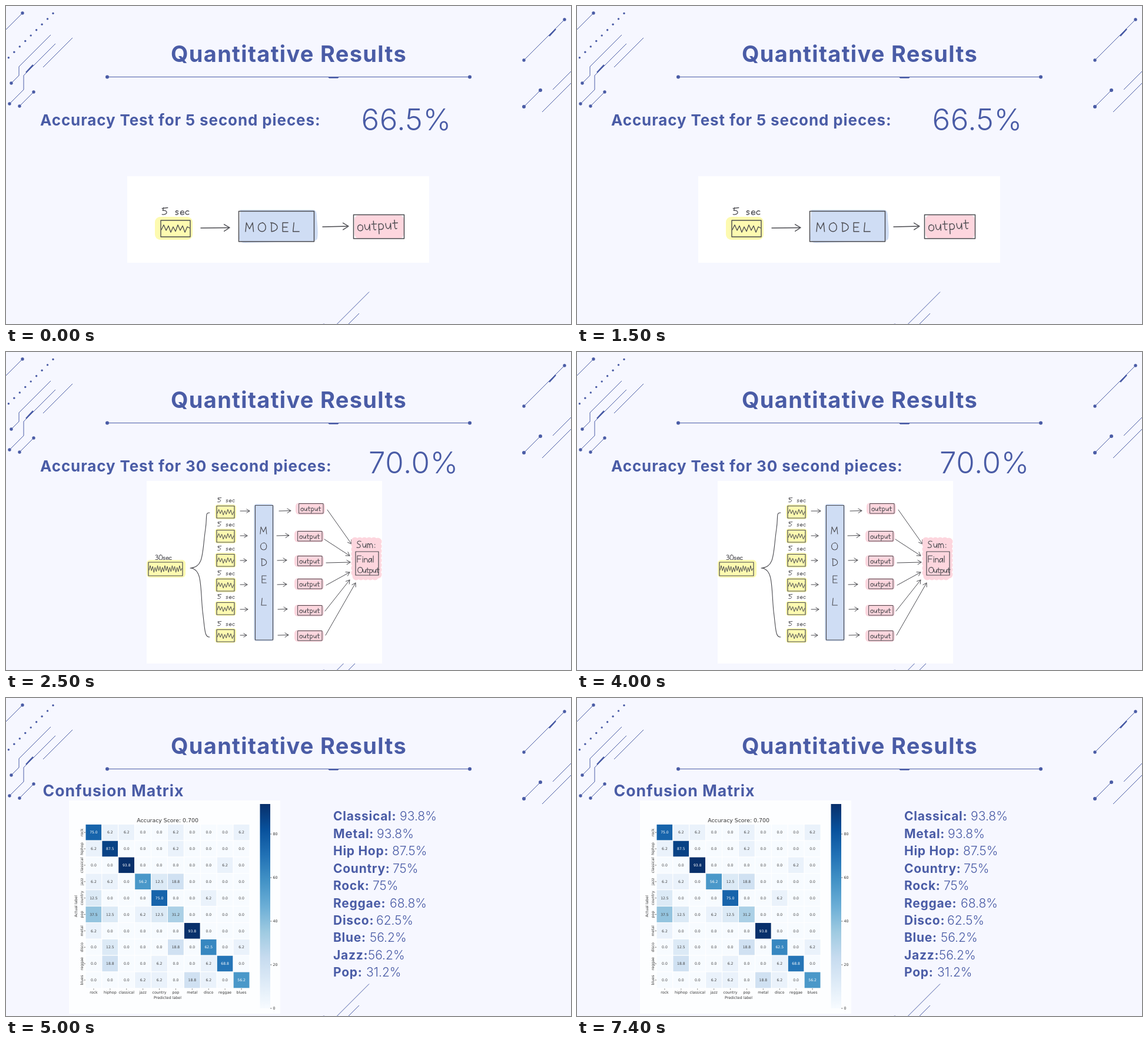
Write an HTML page that moves like this. It is 960 by 540 pixels and loops after 9 s.

```html
<!DOCTYPE html>
<html lang="en">
<head>
<meta charset="utf-8">
<title>Quantitative Results</title>
<style>
html, body { margin: 0; width: 100%; height: 100%; overflow: hidden; background: #f6f7ff; }
svg { display: block; width: 960px; height: 540px; }
.sans { font-family: Inter, "Open Sans", sans-serif; fill: #4a5ca6; }
.bold { font-weight: 700; }
.light { font-weight: 300; }
.plot { font-family: "DejaVu Sans", sans-serif; fill: #333; text-anchor: middle; }
.trace { fill: none; stroke: #4a5ca6; }
.ink { fill: none; stroke: #4b4b50; stroke-linecap: round; stroke-linejoin: round; }
</style>
</head>
<body>
<svg id="stage" viewBox="0 0 960 540"></svg>
<script>
const stage = document.getElementById('stage');

function el(parent, tag, attrs, text) {
  const node = document.createElementNS('http://www.w3.org/2000/svg', tag);
  for (const k in attrs) node.setAttribute(k, attrs[k]);
  if (text !== undefined) node.textContent = text;
  parent.appendChild(node);
  return node;
}
const group = (parent, attrs) => el(parent, 'g', attrs);
const box = (p, x, y, width, height, attrs) => el(p, 'rect', { x, y, width, height, ...attrs });
const path = (p, d, attrs) => el(p, 'path', { d, ...attrs });
const blob = (p, x, y, w, h, fill, rx = 6) => box(p, x, y, w, h, { fill, rx });
const label = (p, s, x, y, size, cls, attrs) =>
  el(p, 'text', { x, y, 'font-size': size, class: cls, ...attrs }, s);
const bold = (p, s, x, y, size, attrs) =>
  label(p, s, x, y, size, 'sans bold', { 'letter-spacing': '0.034em', ...attrs });
const score = (p, s, x, y) => label(p, s, x, y, 51, 'sans light', { 'letter-spacing': '0.01em' });

const BLUE = '#4a5ca6', YELLOW = '#fdfab0', SKY = '#cfddf4', PINK = '#fdd6de';

// Pen strokes on a 10 unit cap height: [width, path]
const GLYPHS = {
  M: [9, 'M0 10L1 0L4.5 7L8 0L9 10'],
  O: [8, 'M5 0C-2 0-2 10 4 10C10 10 9 0 4 0'],
  D: [8, 'M1 0V10C11 9 9 0 0 0'],
  E: [6, 'M6 0H0V10H6M0 5H5'],
  L: [7, 'M1 0L0 10H7'],
  S: [6, 'M6 1C2-1-1 3 2 4.5C7 6 6 11 0 9.5'],
  F: [6, 'M6 0H0V10M0 5H5'],
  0: [7, 'M4 0C-1 0-1 10 3 10C8 10 8 0 3 0'],
  3: [6, 'M0 1C4-1 7 3 2 4.5C8 5 5 11 0 9.5'],
  5: [9, 'M3 0L2 4C10 3 9 11 1 9.5M1 1L9 0'],
  a: [5, 'M5 5C1 2-1 8 1 10C3 10 4 8 5 4V10'],
  c: [5, 'M5 5C1 3-1 7 1 9C2 10 4 10 5 9'],
  e: [5, 'M0 7.5L5 7C5 3 0 4 0 7.5C0 11 4 10 5 9'],
  i: [2, 'M1 4V10M1 1.5V2'],
  l: [2, 'M1 0V10'],
  m: [7, 'M0 4V10M0 6C1 3 3 3 3 10M3 6C4 3 7 3 7 10'],
  n: [5, 'M0 4V10M0 6C2 3 5 3 5 10'],
  o: [5, 'M3 4C-1 4-1 10 2.5 10C6 10 6 4 2.5 4'],
  p: [5, 'M0 4V14M0 5C3 2 6 6 4 9C3 10 1 10 0 9'],
  s: [5, 'M4 5C0 3-1 7 2 7C5 7 4 11 0 9.5'],
  t: [5, 'M2 1V8C2 10 3 10 4 9.5M0 4H5'],
  u: [5, 'M0 4C0 11 4 11 5 4V10'],
  ':': [2, 'M1 5V5.5M1 9V9.5'],
  ' ': [7, '']
};

function hand(p, s, x, base, k, gap = 2, pen = 1, turn = 0) {
  const g = group(p, { class: 'ink', role: 'img', 'aria-label': s, 'stroke-width': pen / k,
    transform: `translate(${x} ${base}) rotate(${turn}) scale(${k}) translate(0 -10)` });
  let at = 0;
  for (const ch of s) {
    const [w, d] = GLYPHS[ch];
    if (d) path(g, d, { transform: `translate(${at} 0)` });
    at += w + gap;
  }
}

function arrow(p, x1, y1, x2, y2, head = 6, pen = 1) {
  const a = Math.atan2(y2 - y1, x2 - x1);
  const tip = s => `${x2 - head * Math.cos(a + s)} ${y2 - head * Math.sin(a + s)}`;
  path(p, `M${x1} ${y1}L${x2} ${y2}M${tip(0.55)}L${x2} ${y2}L${tip(-0.55)}`,
    { class: 'ink', 'stroke-width': pen });
}

function wave(p, x, y, w, amp, n, pen = 1) {
  let d = `M${x} ${y + 2}`;
  for (let i = 1; i < n; i++) {
    const size = amp * (0.72 + 0.28 * Math.sin(i * 2.1));
    d += `L${x + w * i / n} ${y + (i % 2 ? -size : size)}`;
  }
  path(p, d + `L${x + w} ${y - 1}`, { class: 'ink', 'stroke-width': pen });
}

const frame = (p, x, y, w, h, pen = 1) => box(p, x, y, w, h, { class: 'ink', 'stroke-width': pen });

function backdrop() {
  const g = group(stage);
  const dot = (x, y, r = 2.7) => el(g, 'circle', { cx: x, cy: y, r, fill: BLUE });
  path(g, 'M28 12L0 40M76 49L22 103V118L9 131M84 64L30 118V142L6 166M113 54L63 104M47 146L23 170' +
    'M949 23L880 92M908 143L880 171M960 111L929 142M960 131L911 180' +
    'M617 485.5L562 540.5M600 522L581 541M172 120.5H788', { class: 'trace' });
  path(g, 'M46 100L34 113M934 39L923 51', { class: 'trace', 'stroke-width': 2.5 });
  path(g, 'M547 120.5H566L564 122.7H549Z', { fill: BLUE });
  for (let i = 0; i < 9; i++) dot(80 - i * 9.45, 12.5 + i * 9.4, 1.7);
  for (const [x, y] of [[28, 12], [9, 131], [6, 166], [47, 146], [23, 170], [949, 23], [880, 92]]) dot(x, y);
  for (const [x, y] of [[908, 143], [880, 171], [172, 120.5], [788, 120.5]]) dot(x, y, 3);
  dot(540, 542, 2.5);
  bold(g, 'Quantitative Results', 480.5, 95, 38, { 'text-anchor': 'middle' });
}

function shortTest() {
  const g = group(stage);
  bold(g, 'Accuracy Test for 5 second pieces:', 58, 202.5, 26);
  score(g, '66.5%', 603.5, 211);
  box(g, 206, 289, 513, 147, { fill: '#fff' });

  hand(g, '5 sec', 264, 354.5, 1.2, 2, 1.3);
  blob(g, 253, 358, 64, 39, YELLOW, 9);
  frame(g, 263, 364, 50, 28, 1.4);
  wave(g, 264, 378, 48, 6.5, 12, 1.3);
  arrow(g, 331, 377, 380, 376.5, 11, 1.4);

  path(g, 'M398 346H520Q529 345 528 360Q531 385 529 395Q527 400 515 400L412 402Q398 404 396 396Z', { fill: SKY });
  frame(g, 395.5, 348.5, 128, 51.5, 1.5);
  hand(g, 'MODEL', 407, 383, 1.5, 5.7, 1.4);
  arrow(g, 538, 375, 582, 374, 11, 1.4);

  blob(g, 592, 355, 84, 40, PINK, 8);
  frame(g, 590.5, 354.5, 86, 40.5, 1.5);
  hand(g, 'output', 598, 382, 1.7, 2, 1.4, -3);
  return g;
}

function longTest() {
  const g = group(stage);
  bold(g, 'Accuracy Test for 30 second pieces:', 58, 202.5, 26);
  score(g, '70.0%', 616, 206);
  box(g, 239, 219, 400, 310, { fill: '#fff' });

  hand(g, '30sec', 254, 353, 0.85, 1);
  blob(g, 239, 353, 66, 30, YELLOW);
  frame(g, 242, 357, 58, 23, 1.2);
  wave(g, 243, 368.5, 56, 6, 27);
  path(g, 'M346 273C338 272 342 280 339 300C333 340 337 366 313 367' +
    'C334 368 330 400 334 440C338 470 337 485 346 484', { class: 'ink', 'stroke-width': 1.1 });

  blob(g, 421, 258, 34, 233, SKY, 5);
  frame(g, 423.5, 260.5, 30, 228.5, 1.2);
  [['M', 432, 309], ['O', 433, 336], ['D', 433.5, 363], ['E', 435, 392], ['L', 434, 430]]
    .forEach(([ch, x, y]) => hand(g, ch, x, y, 1.2, 0, 1.1));

  // piece top, arrow y, first arrow tip, second arrow ends, output box corner, link to the sum
  const rows = [
    [261, 270, 414, 464, 484, 498, 257, 546, 268, 587, 326],
    [302, 312, 410, 460, 481, 496, 304, 541, 318, 584, 346],
    [343, 354, 409, 461, 477, 496, 346, 544, 358, 585, 357],
    [385, 395, 410, 461, 477, 496, 385, 544, 396, 584, 374],
    [425, 437, 411, 462, 478, 496, 430, 542, 440, 584, 387],
    [471, 481, 409, 462, 480, 496, 473, 543, 481, 594, 392]
  ];
  for (const [top, y, tip, from, to, ox, oy, ...link] of rows) {
    hand(g, '5 sec', 359, top - 6, 0.75);
    blob(g, 355, top - 2, 36, 25, YELLOW, 5);
    frame(g, 358, top + 0.5, 30, 20.5, 1.2);
    wave(g, 359, top + 11, 28, 5, 11);
    arrow(g, 398, y, tip, y, 6);
    arrow(g, from, y, to, y - 0.5, 7);
    blob(g, ox - 6, oy - 1, 50, 20, PINK);
    frame(g, ox, oy + 0.5, 41, 16.5);
    hand(g, 'output', ox + 3, oy + 13, 0.85);
    arrow(g, ...link, 7);
  }

  box(g, 593, 321, 39, 60, { fill: PINK, stroke: PINK, 'stroke-width': 13,
    'stroke-linecap': 'round', 'stroke-dasharray': '0 8' });
  hand(g, 'Sum:', 596, 332.5, 1.2, 2.2, 1.1);
  frame(g, 594, 339, 39, 40, 1.2);
  hand(g, 'Final', 597, 357, 1.1, 1.4, 1.1);
  hand(g, 'Output', 598, 375, 0.95, 1, 1.1);
  return g;
}

const RAMP = ['f7fbff', 'deebf7', 'c6dbef', '9ecae1', '6baed6', '4292c6', '2171b5', '08519c', '08306b'];

function shade(v) {
  const at = Math.min(v * 8, 7.999), i = Math.floor(at), f = at - i;
  const part = (hex, c) => parseInt(hex.slice(c, c + 2), 16);
  return `rgb(${[0, 2, 4].map(c => Math.round(part(RAMP[i], c) * (1 - f) + part(RAMP[i + 1], c) * f))})`;
}

// Sixteenths as a percentage, halves rounded to even
const percent = n => (n * 6.25 - (n % 4 === 1 ? 0.01 : 0)).toFixed(1);

function matrix() {
  const g = group(stage);
  bold(g, 'Confusion Matrix', 62.5, 167, 26.7);
  box(g, 107, 174, 359, 362, { fill: '#fdfeff' });
  label(g, 'Accuracy Score: 0.700', 274.5, 210.5, 9.35, 'plot');

  const genres = ['rock', 'hiphop', 'classical', 'jazz', 'country', 'pop', 'metal', 'disco', 'reggae', 'blues'];
  const counts = ['c110010001', '1e00010000', '00f0000010', '1109230000', '2000c00100',
    '6201250000', '100000f000', '0200030a01', '03001001b0', '0001103109'];
  const x0 = 135, y0 = 214.3, w = 27.9, h = 27.86;
  const mark = d => path(g, d, { stroke: '#444', 'stroke-width': 0.7 });
  const upright = (s, x, y, size) =>
    label(g, s, 0, 0, size, 'plot', { transform: `translate(${x} ${y}) rotate(-90)` });

  counts.forEach((row, r) => {
    const cy = y0 + (r + 0.5) * h, cx = x0 + (r + 0.5) * w;
    [...row].forEach((ch, c) => {
      const n = parseInt(ch, 16), x = x0 + c * w;
      box(g, x, y0 + r * h, w, h, { fill: shade(n / 15), stroke: '#fff', 'stroke-width': 1 });
      label(g, percent(n), x + w / 2, cy + 2.2, 6.1, 'plot', { style: `fill:${n > 8 ? '#fff' : '#444'}` });
    });
    mark(`M${cx} 493V495.5M132.5 ${cy}H135`);
    label(g, genres[r], cx, 502, 6.3, 'plot');
    upright(genres[r], 130.5, cy, 6.3);
  });
  label(g, 'Predicted label', 274.5, 511, 6.3, 'plot');
  upright('Actual label', 120.5, 353.5, 6.3);

  const grad = el(el(g, 'defs'), 'linearGradient', { id: 'ramp', x1: 0, y1: 1, x2: 0, y2: 0 });
  RAMP.forEach((c, i) => el(grad, 'stop', { offset: i / 8, 'stop-color': '#' + c }));
  box(g, 431.5, 180, 17.5, 347, { fill: 'url(#ramp)' });
  for (let v = 0; v <= 80; v += 20) {
    const y = 527 - v * 3.7;
    mark(`M449 ${y}H451.5`);
    label(g, v, 453.5, y + 2.3, 6.3, 'plot', { style: 'text-anchor:start' });
  }

  [['Classical:', '93.8%', 670], ['Metal:', '93.8%', 631], ['Hip Hop:', '87.5%', 657],
    ['Country:', '75%', 658], ['Rock:', '75%', 624], ['Reggae:', '68.8%', 653],
    ['Disco:', '62.5%', 630], ['Blue:', '56.2%', 619], ['Jazz:', '56.2%', 616], ['Pop:', '31.2%', 613]
  ].forEach(([name, share, x], i) => {
    const y = 208.3 + i * 29.45;
    bold(g, name, 556, y, 21);
    label(g, share, x - 1, y, 21, 'sans light');
  });
  return g;
}

backdrop();
const scenes = [shortTest(), longTest(), matrix()];

function draw(ms) {
  const t = ms % 9000, now = t < 2500 ? 0 : t < 5000 ? 1 : 2;
  scenes.forEach((s, i) => s.setAttribute('display', i === now ? 'inline' : 'none'));
}

function tick() {
  draw(performance.now());
  requestAnimationFrame(tick);
}
tick();
</script>
</body>
</html>
```
